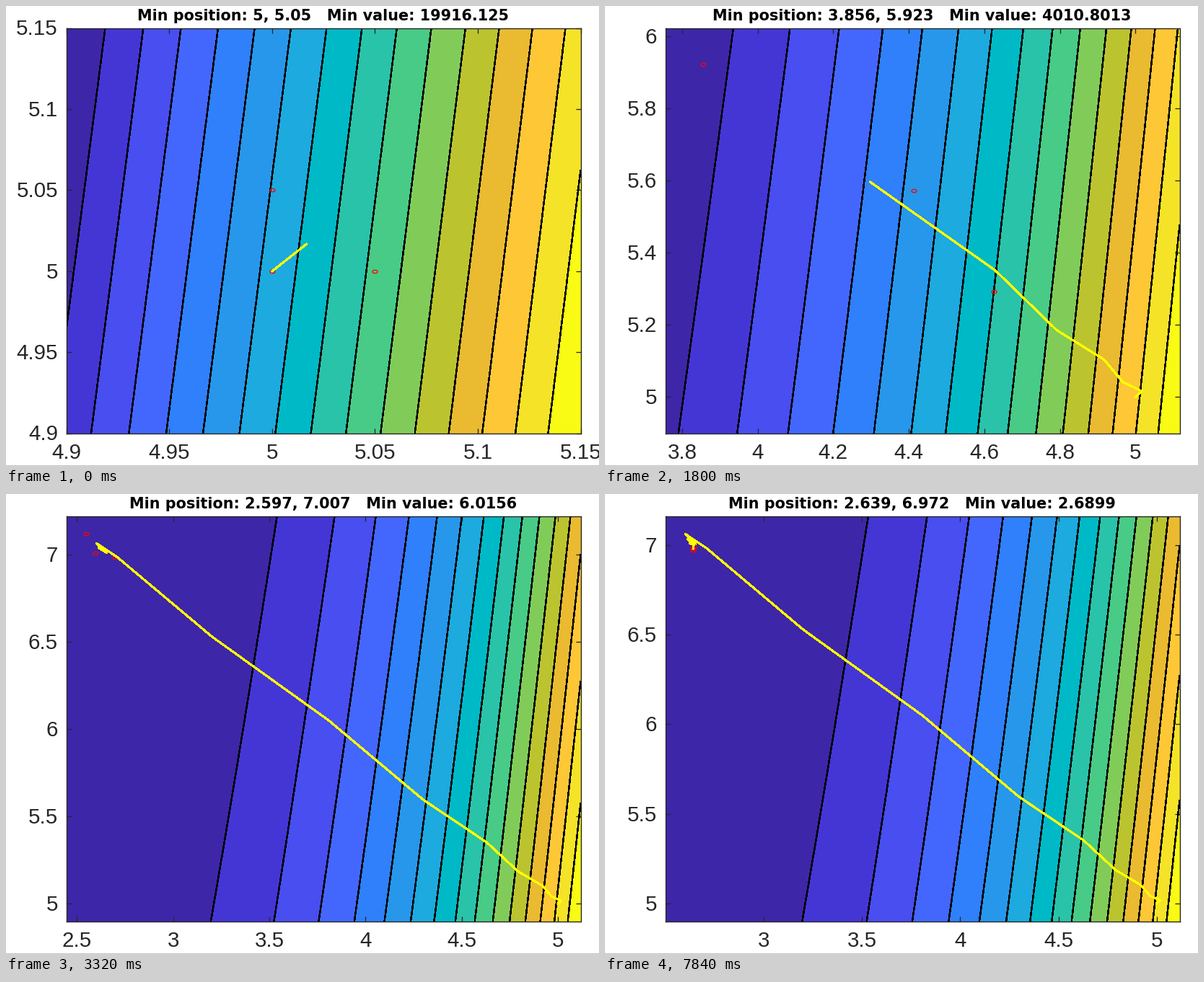
Recreate the animation shown at these times as a matplotlib script. Size 822 px wide and 638 px high, loop 8000 ms.

```python
import math

import numpy as np
import matplotlib.pyplot as plt
from matplotlib.animation import FuncAnimation
from matplotlib.path import Path
from matplotlib.patches import Rectangle
from matplotlib.transforms import Affine2D

W, H, DPI = 822, 638, 64
FRAME_MS, LOOP_MS = 40, 8000
LEFT, RIGHT, TOP, BOTTOM = 84, 796.5, 30.5, 592.5
BANDS = 16
INK = "#262626"
PARULA = ["#3e26a8", "#4436d5", "#484ef0", "#4367fd", "#2f80fa", "#2797eb",
          "#1caadf", "#00b9c7", "#29c3aa", "#48cb86", "#81cc59", "#bbc42f",
          "#eaba30", "#fec735", "#f5e327", "#f9fb15"]

# Time in ms at which each simplex step appears
STEP_MS = [320, 840, 1080, 1400, 1800, 2040, 2320, 2480, 2640, 2800, 3320,
           3480, 3880, 4040, 4240, 4400, 4600, 4760, 4880, 5040, 5200, 5320,
           5480, 5600, 5760, 5880, 6200, 6440, 6760, 7200, 7360, 7520, 7840]

OVAL = Path.unit_circle().transformed(Affine2D().scale(1, 0.62))


def px(n):
    """Pixels to points."""
    return n * 72 / DPI


def cost(x, y):
    return 50 * (y - x * x) ** 2 + (1 - x) ** 2


def nelder_mead_step(simplex):
    """One step on a simplex sorted from best to worst."""
    best, mid, worst = simplex
    centre = (best + mid) / 2

    def along(t):
        return centre + t * (centre - worst)

    f_best, f_mid, f_worst = (cost(*p) for p in simplex)
    refl = along(1)
    f_refl = cost(*refl)
    if f_refl < f_best:
        far = along(2)
        new = far if cost(*far) < f_refl else refl
    elif f_refl < f_mid:
        new = refl
    else:
        outside = f_refl < f_worst
        new = along(0.5 if outside else -0.5)
        limit = f_refl if outside else f_worst
        if cost(*new) > limit:
            return [best, (best + mid) / 2, (best + worst) / 2]
    return [best, mid, new]


def run(steps):
    """All simplexes, and the trail of their centroids."""
    start = np.array([5.0, 5.0])
    simplex = [start, start + [0.05, 0], start + [0, 0.05]]
    simplexes, trail = [], [start]
    for _ in range(steps + 1):
        simplex = sorted(simplex, key=lambda p: cost(*p))
        simplexes.append(np.array(simplex))
        trail.append(sum(simplex) / 3)
        simplex = nelder_mead_step(simplex)
    return simplexes, np.array(trail)


def ticks(lo, hi):
    """Round tick values, with fewer than ten intervals."""
    span = hi - lo
    power = 10.0 ** math.floor(math.log10(span / 10))
    step = next(m * power for m in (1, 2, 5, 10) if span / (m * power) < 10)
    first = math.ceil(lo / step - 1e-6)
    last = math.floor(hi / step + 1e-6)
    return [round(k * step, 6) for k in range(first, last + 1)]


def title(point):
    x, y = (math.floor(v * 1000 + 0.5 + 1e-6) / 1000 for v in point)
    value = cost(*point)
    digits = math.floor(math.log10(value)) + 5
    return f"Min position: {x:g}, {y:g}   Min value: {value:.{digits}g}"


def label(x, y, text, size, **style):
    fig.text(x / W, 1 - y / H, text, fontsize=px(size), va="baseline", **style)


def draw(step):
    fig.clear()
    simplex, path = simplexes[step], trail[:step + 2]
    seen = np.vstack([simplex, path])
    (x0, y0), (x1, y1) = seen.min(axis=0) - 0.1, seen.max(axis=0) + 0.1

    ax = fig.add_axes([LEFT / W, 1 - BOTTOM / H,
                       (RIGHT - LEFT) / W, (BOTTOM - TOP) / H])
    xs, ys = np.meshgrid(np.linspace(x0, x1, 80), np.linspace(y0, y1, 80))
    z = cost(xs, ys)
    levels = np.linspace(z.min(), z.max(), BANDS + 1)
    lines = levels[1:-1].copy()
    levels[0] -= 1
    levels[-1] += 1
    ax.contourf(xs, ys, z, levels, colors=PARULA)
    ax.contour(xs, ys, z, lines, colors="k", linewidths=px(1.5),
               antialiased=False)
    ax.plot(*simplex.T, ls="", marker=OVAL, ms=px(7), mfc="none",
            mec="red", mew=px(1.3))
    ax.plot(*path.T, color="yellow", lw=px(2), zorder=3, antialiased=False)

    ax.set_xlim(x0, x1)
    ax.set_ylim(y0, y1)
    ax.set_xticks(ticks(x0, x1))
    ax.set_yticks(ticks(y0, y1))
    ax.tick_params(direction="in", length=px(7), width=px(1.3), color=INK,
                   top=True, right=True, labelbottom=False, labelleft=False)
    for spine in ax.spines.values():
        spine.set(color=INK, linewidth=px(1.4))

    style = dict(family="Liberation Sans", color=INK)
    for v in ticks(x0, x1):
        x = LEFT + (v - x0) / (x1 - x0) * (RIGHT - LEFT)
        label(x, 628.5, f"{v:g}", 29.5, ha="center", **style)
    for v in ticks(y0, y1):
        y = BOTTOM - (v - y0) / (y1 - y0) * (BOTTOM - TOP)
        label(72, y + 10, f"{v:g}", 29.5, ha="right", **style)
    label(439.5, 19.8, title(simplex[0]), 20.7, ha="center", color="k",
          family="DejaVu Sans", weight="bold")

    fig.add_artist(Rectangle((0, 0), 1, 1.5 / H, color="#c4c4c4", lw=0))


simplexes, trail = run(len(STEP_MS))
fig = plt.figure(figsize=(W / DPI, H / DPI), dpi=DPI, facecolor="white")
shown = None


def update(frame):
    global shown
    step = sum(t <= frame * FRAME_MS for t in STEP_MS)
    if step != shown:
        draw(step)
        shown = step
    return []


anim = FuncAnimation(fig, update, frames=LOOP_MS // FRAME_MS,
                     interval=FRAME_MS, repeat=True, repeat_delay=0)
plt.show()
```
